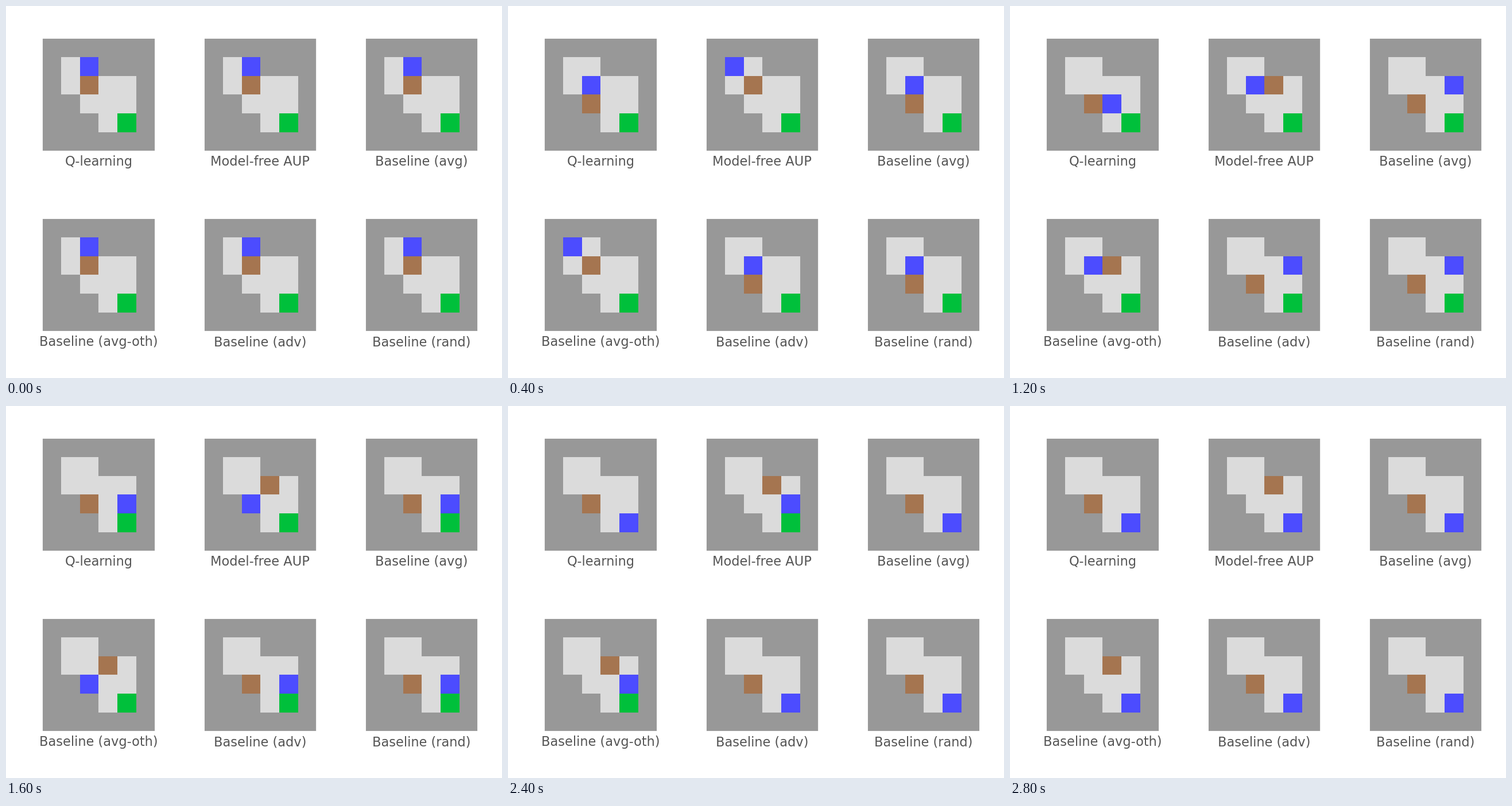
These frames come from a looping animation (864 px wide and 648 px high, 3200 ms). A matplotlib script:

```python
import matplotlib.pyplot as plt
import numpy as np
from matplotlib.animation import FuncAnimation

W, H, DPI = 864, 648, 135
SIDE = 196.5
STEP_MS = 400

WALL, FLOOR = (152, 152, 152), (219, 219, 219)
AGENT, CRATE, GOAL = (76, 76, 255), (165, 117, 80), (0, 192, 59)

MAP = ["######",
       "#  ###",
       "#    #",
       "##   #",
       "###  #",
       "######"]
START, CRATE_START, GOAL_CELL = (1, 2), (2, 2), (4, 4)
MOVES = {"U": (-1, 0), "D": (1, 0), "L": (0, -1), "R": (0, 1)}

PANELS = [("Q-learning", "DRDRD"),
          ("Model-free AUP", "LDRDRRD"),
          ("Baseline (avg)", "DRRDD"),
          ("Baseline (avg-oth)", "LDRDRRD"),
          ("Baseline (adv)", "DRRDD"),
          ("Baseline (rand)", "DRRDD")]
STEPS = 1 + max(len(path) for _, path in PANELS)

ROOM = np.array([[WALL if c == "#" else FLOOR for c in row] for row in MAP],
                dtype=np.uint8)


def shift(cell, move):
    return cell[0] + move[0], cell[1] + move[1]


def board(path, step):
    """Replay the first moves of a path; the agent pushes the crate."""
    agent, crate = START, CRATE_START
    for key in path[:step]:
        agent = shift(agent, MOVES[key])
        if agent == crate:
            crate = shift(crate, MOVES[key])
    grid = ROOM.copy()
    grid[GOAL_CELL] = GOAL
    grid[crate] = CRATE
    grid[agent] = AGENT
    return grid


def add_panel(index, title, path):
    row, col = divmod(index, 3)
    cx, cy = 161.6 + 281.25 * col, 154.4 + 314 * row
    ax = fig.add_axes([(cx - SIDE / 2) / W, 1 - (cy + SIDE / 2) / H,
                       SIDE / W, SIDE / H])
    ax.set_xticks([])
    ax.set_yticks([])
    for spine in ax.spines.values():
        spine.set(color="white", linewidth=1)
    ax.set_xlabel(title, fontsize=12, color="#555555")
    return ax.imshow(board(path, 0), interpolation="nearest")


plt.rcParams["font.family"] = "DejaVu Sans"
fig = plt.figure(figsize=(W / DPI, H / DPI), dpi=DPI, facecolor="white")
images = [add_panel(i, *panel) for i, panel in enumerate(PANELS)]


def update(step):
    for image, (_, path) in zip(images, PANELS):
        image.set_data(board(path, step))
    return images


anim = FuncAnimation(fig, update, frames=STEPS, interval=STEP_MS,
                     repeat=True, repeat_delay=0, blit=False)
plt.show()
```
